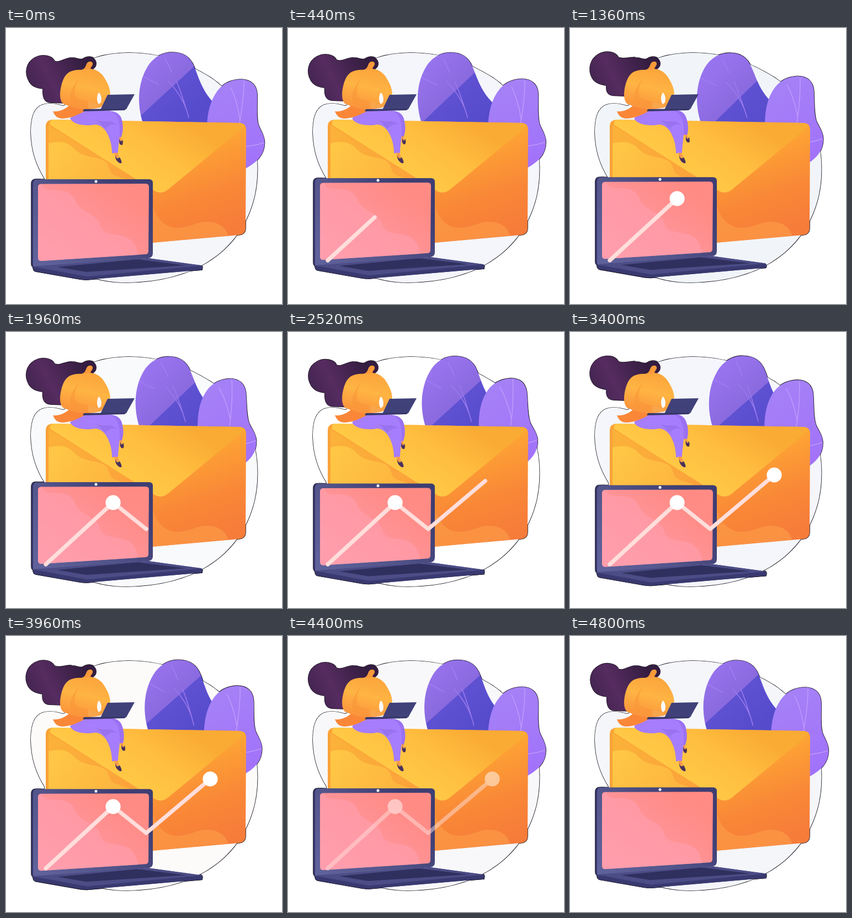
These frames come from a looping animation (500 by 500 pixels, 4.84 s). An HTML page:

```html
<!DOCTYPE html>
<html lang="en">
<head>
<meta charset="utf-8">
<title>Growing results</title>
<style>
html, body { margin: 0; width: 100%; height: 100%; overflow: hidden; background: #fff; }
svg { display: block; width: 100vw; height: 100vh; }
.vein { fill: none; stroke-width: 1.6; stroke-linecap: round; }
.trend { fill: none; stroke: #ffdedb; stroke-width: 7.2; stroke-linecap: round; stroke-linejoin: round; stroke-dasharray: 1 2; }
</style>
</head>
<body>
<svg viewBox="0 0 500 500">
  <defs>
    <linearGradient id="leafTone" gradientUnits="userSpaceOnUse" x1="144" y1="155" x2="240" y2="259">
      <stop offset="0" stop-color="#9873ee"/><stop offset=".497" stop-color="#8a6adf"/>
      <stop offset=".503" stop-color="#5e51d2"/><stop offset="1" stop-color="#554bcb"/>
    </linearGradient>
    <linearGradient id="leafSoft" x1="0" y1="0" x2=".3" y2="1">
      <stop offset="0" stop-color="#a583f6"/><stop offset="1" stop-color="#a273fa"/>
    </linearGradient>
    <linearGradient id="paper" gradientUnits="userSpaceOnUse" x1="330" y1="220" x2="385" y2="375">
      <stop offset="0" stop-color="#fda334"/><stop offset=".55" stop-color="#f98737"/><stop offset="1" stop-color="#f67c3a"/>
    </linearGradient>
    <linearGradient id="flap" gradientUnits="userSpaceOnUse" x1="225" y1="270" x2="305" y2="155">
      <stop offset="0" stop-color="#ffc845"/><stop offset=".5" stop-color="#ffbe3f"/><stop offset="1" stop-color="#faab33"/>
    </linearGradient>
    <linearGradient id="side" gradientUnits="userSpaceOnUse" x1="75" y1="190" x2="250" y2="300">
      <stop offset="0" stop-color="#fbb23a"/><stop offset="1" stop-color="#fb9f3a"/>
    </linearGradient>
    <linearGradient id="sideGlow" gradientUnits="userSpaceOnUse" x1="80" y1="215" x2="190" y2="290">
      <stop offset="0" stop-color="#ffc745"/><stop offset="1" stop-color="#fdb53f"/>
    </linearGradient>
    <linearGradient id="hairTone" gradientUnits="userSpaceOnUse" x1="40" y1="110" x2="140" y2="60">
      <stop offset="0" stop-color="#41244f"/><stop offset=".4" stop-color="#562c60"/><stop offset="1" stop-color="#341d40"/>
    </linearGradient>
    <linearGradient id="knit" x1=".6" y1="0" x2=".3" y2="1">
      <stop offset="0" stop-color="#fba53b"/><stop offset=".45" stop-color="#ffb443"/><stop offset="1" stop-color="#fa913b"/>
    </linearGradient>
    <linearGradient id="frame" gradientUnits="userSpaceOnUse" x1="60" y1="420" x2="210" y2="290">
      <stop offset="0" stop-color="#5f619a"/><stop offset=".5" stop-color="#52548a"/><stop offset="1" stop-color="#3e3e73"/>
    </linearGradient>
    <linearGradient id="glass" gradientUnits="userSpaceOnUse" x1="100" y1="420" x2="200" y2="290">
      <stop offset="0" stop-color="#ff9bab"/><stop offset="1" stop-color="#ff8b84"/>
    </linearGradient>
  </defs>

  <!-- thin dark rim, visible only outside the backdrop -->
  <g stroke="#17131d" stroke-width="1.6">
    <use href="#bigLeaf"/><use href="#smallLeaf"/><use href="#hair"/><use href="#cap"/>
    <use href="#envelope"/><use href="#laptop"/><use href="#blob"/>
  </g>

  <path id="blob" d="M103 141C90 137 78 135 66 139C49 145 45 166 45 190C46 222 54 247 70 273C73 310 72 345 82 385C94 430 150 462 220 461C280 460 330 446 365 424C410 396 438 355 450 306C458 272 458 228 446 193C433 153 408 115 371 90C330 64 281 44 220 45C180 46 150 54 135 70C118 88 122 138 103 141Z"/>

  <g id="bigLeaf">
    <path fill="url(#leafTone)" d="M248 172C237 138 238 97 259 66C272 49 287 44 301 44C324 44 335 55 341 70C349 88 354 112 376 135C383 150 368 190 345 230L270 230C258 212 251 190 248 172Z"/>
    <g class="vein" stroke="#9a79ec">
      <path d="M309 97C319 120 324 138 331 162M294 96C308 111 320 128 327 148"/>
      <path stroke="#a17ef2" d="M249 88Q262 95 276 102M288 55Q295 67 300 80"/>
    </g>
  </g>

  <g id="smallLeaf">
    <path fill="url(#leafSoft)" d="M364 178C365 152 371 126 388 108C399 97 413 93 427 93C445 94 454 104 455 119C456 136 453 157 457 174C460 185 468.500 193 468.500 208C468 230 455 243 435 254L405 265Z"/>
    <path class="vein" stroke="#bd99fb" d="M422 178C427 151 431 122 431 96M424 168C421 147 416 126 407 108M432 215Q451 213 467 208"/>
  </g>

  <g id="envelope">
    <path fill="url(#paper)" d="M84 166L424 172Q435 173 435 184L434 362Q434 374 422 375L265 389L72 404L72 178Q72 167 84 166Z"/>
    <path fill="#f9a238" d="M72 178L78 173L100 380L72 390Z"/>
    <path fill="url(#side)" d="M77 176L265 292L220 390L77 400Z"/>
    <path fill="url(#sideGlow)" d="M77 209C98 204 112 206 125 220C139 235 161 232 177 240C190 247 183 260 197 267L225 277L250 390L77 400Z"/>
    <path fill="#fb9946" opacity=".75" d="M265 318C272 343 286 360 307 362C332 363 344 351 364 351C384 351 399 361 402 376L265 389Z"/>
    <path fill="url(#flap)" d="M84 166L424 172Q431 173 433 178L293 293Q280 303 266 293L79 175Q80 167 84 166Z"/>
  </g>

  <g id="woman">
    <path id="hair" fill="url(#hairTone)"/>
    <path id="cap" fill="url(#hairTone)" d="M96 92C96 66 109 53 123 54C130 55 134 58 139 56C145 52 151 51 156 53C164 56 166 65 162 71L157 76L135 82Z"/>
    <path fill="#f9993a" d="M133 77C143 75 144 70 146 65C148 60 156 59 157 64C158 68 153 70 153 75L148 82Z"/>
    <g id="shin">
      <path fill="#9a71f2" d="M166 153C189 147 207 151 210 167C213 179 212 190 208 199L203 198C199 186 189 180 180 169Z"/>
      <path fill="#f79a4b" d="M204 197L208 198L210 207L206 207Z"/>
      <path fill="#49325c" d="M206 200C206 207 210 206 211 202C213 209 211 213 209 212C205 211 204 206 206 200Z"/>
    </g>
    <path fill="#a67dfc" d="M116 164C122 156 134 151 148 150L188 150C202 154 207 172 206 187C206 202 203 214 203 226L192 227C192 212 188 198 181 187C176 180 170 175 161 175C145 178 123 176 116 164Z"/>
    <path fill="#8e68e5" opacity=".5" d="M164 166C177 174 190 163 200 176C194 172 187 176 180 182Z"/>
    <path fill="#fa8738" d="M85 151C97 152 108 147 116 139L148 149C134 154 123 163 103 164C92 164 88 158 85 151Z"/>
    <path fill="#f79a4b" d="M196 226L202 226L205 235L199 236Z"/>
    <path fill="#49325c" d="M198 230C199 236 202 238 206 234C209 240 211 245 208 245C203 245 197 238 198 230Z"/>
    <path fill="url(#knit)" d="M119 78C131 74 143 77 151 74C163 73 175 82 181 95C188 107 191 120 187 128L174 142C171 145 160 146 151 147C137 150 118 143 105 138C96 133 97 115 101 101C105 88 110 81 119 78Z"/>
    <path fill="#f9963a" opacity=".55" d="M132 91C125 104 121 120 129 127C137 132 150 130 153 138L144 145C130 142 117 139 116 130C115 115 124 101 132 91Z"/>
    <path fill="#fbfafa" d="M168 117C172 119 174 127 172 135L168 138C164 133 164 123 168 117Z"/>
    <path fill="#f9a54c" d="M148 135C156 132 161 139 170 139L168 145L149 145Z"/>
    <path fill="#41417a" d="M184 121L233 120L218 147L171 148Z"/>
    <path fill="#37376a" d="M141 147L218 146L215 149L139 151Z"/>
  </g>

  <g id="laptop">
    <path fill="#34346a" d="M53 274L62 274L60 432L50 433Q46 432 46 427L46 281Q47 274 53 274Z"/>
    <path fill="url(#frame)" d="M56 274L260 274Q266 275 266 280L266 408Q266 416 258 417L49 433L49 281Q50 274 56 274Z"/>
    <path fill="url(#glass)" d="M63 282.500L253 282Q259 282 259 288L258 404Q258 410 252 410L64 422Q58 422 58 416L58 288Q58 283 63 282.500Z"/>
    <path fill="#ff9fae" opacity=".65" d="M66 283C70 299 89 291 104 295C126 299 122 315 136 327C150 337 165 341 170 355C174 373 186 372 203 375C226 379 236 389 239 411L64 422Q58 422 58 416L58 288Q59 283 66 283Z"/>
    <circle cx="163" cy="278" r="2.5" fill="#fff"/>
    <path fill="#40407a" d="M49 432L258 417L354 430Q356 431 356 434L355 438L147 456Q140 456 134 455L54 441Q49 440 49 432Z"/>
    <path fill="#4c4d86" d="M49 432L258 417L352 430L147 450Z"/>
    <path fill="#30305f" d="M93 433L238 419L327 430L145 442Z"/>
    <path fill="#393970" d="M49 433L147 451L355 431L355 438L147 456Q140 456 134 455L54 441Q49 440 49 433Z"/>
  </g>

  <g id="chart">
    <path id="rise" class="trend" pathLength="1" d="M72 421L194 309"/>
    <path id="climb" class="trend" pathLength="1" d="M194 309L254 357L370 259"/>
    <circle id="dotA" cx="194" cy="309" fill="#fff"/>
    <circle id="dotB" cx="370" cy="259" fill="#fff"/>
  </g>
</svg>
<script>
const LOOP = 4840, DOT = 13.6;
const el = id => document.getElementById(id);
const clamp = x => Math.max(0, Math.min(1, x));
const span = (t, from, to) => clamp((t - from) / (to - from));
const lerp = (a, b, k) => a + (b - a) * k;

const HAIR_LOW = 'M118 54C106 54 98 64 88 60C84 50 66 46 52 54C36 63 33 82 42 97C48 107 58 109 67 110C66 123 68 134 80 135L104 136L125 100Z';
const HAIR_HIGH = 'M118 53C106 53 96 57 88 53C82 42 66 40 52 47C36 56 32 75 40 90C46 100 56 102 66 104C65 114 68 122 80 122L104 123L125 100Z';

function mixPath(a, b, k) {
  const nums = b.match(/\d+/g);
  let i = 0;
  return a.replace(/\d+/g, n => ' ' + lerp(+n, +nums[i++], k).toFixed(2));
}

// [time, value, ...]
const BACKDROP = [
  [0, 244, 246, 250], [440, 244, 246, 251], [1360, 241, 245, 249], [2520, 255, 255, 255],
  [3400, 244, 246, 251], [3960, 253, 251, 250], [LOOP, 244, 246, 250]
];
const SHADE = [[0, 0], [440, 11], [1360, 26], [2520, 18], [3400, 20], [3960, 2], [LOOP, 0]];

function sample(keys, t) {
  const i = keys.findIndex(k => k[0] > t);
  const a = keys[i - 1], b = keys[i], k = span(t, a[0], b[0]);
  return a.slice(1).map((v, n) => lerp(v, b[n + 1], k));
}

function drawLine(id, p) {
  el(id).style.opacity = p > 0 ? 1 : 0;
  el(id).style.strokeDashoffset = 1 - p;
}

const popDot = (id, p) => el(id).setAttribute('r', DOT * (1 - (1 - p) ** 2));
const move = (id, transform) => el(id).setAttribute('transform', transform);

function render(t) {
  const turn = 2 * Math.PI * t / LOOP;
  const sway = Math.sin(turn), lift = (1 - Math.cos(2 * turn)) / 2;

  move('bigLeaf', `rotate(${-1.5 * sway} 340 560)`);
  move('smallLeaf', `rotate(${-2 * (1 - Math.cos(turn))} 284 436)`);
  move('laptop', `translate(0 ${-3.7 * sway})`);
  move('shin', `rotate(${-6.5 * lift} 170 160)`);
  el('hair').setAttribute('d', mixPath(HAIR_LOW, HAIR_HIGH, lift));

  el('blob').setAttribute('fill', `rgb(${sample(BACKDROP, t).map(Math.round)})`);
  const [shift] = sample(SHADE, t);
  el('leafTone').setAttribute('gradientTransform', `translate(${shift * 0.68} ${shift * 0.73})`);

  drawLine('rise', span(t, 40, 615));
  popDot('dotA', span(t, 615, 1000));
  drawLine('climb', span(t, 1640, 2590));
  popDot('dotB', span(t, 2590, 2950));
  el('chart').style.opacity = 1 - span(t, 4200, 4600);
}

const start = performance.now();
function tick() {
  render((performance.now() - start) % LOOP);
  requestAnimationFrame(tick);
}
tick();
</script>
</body>
</html>
```
